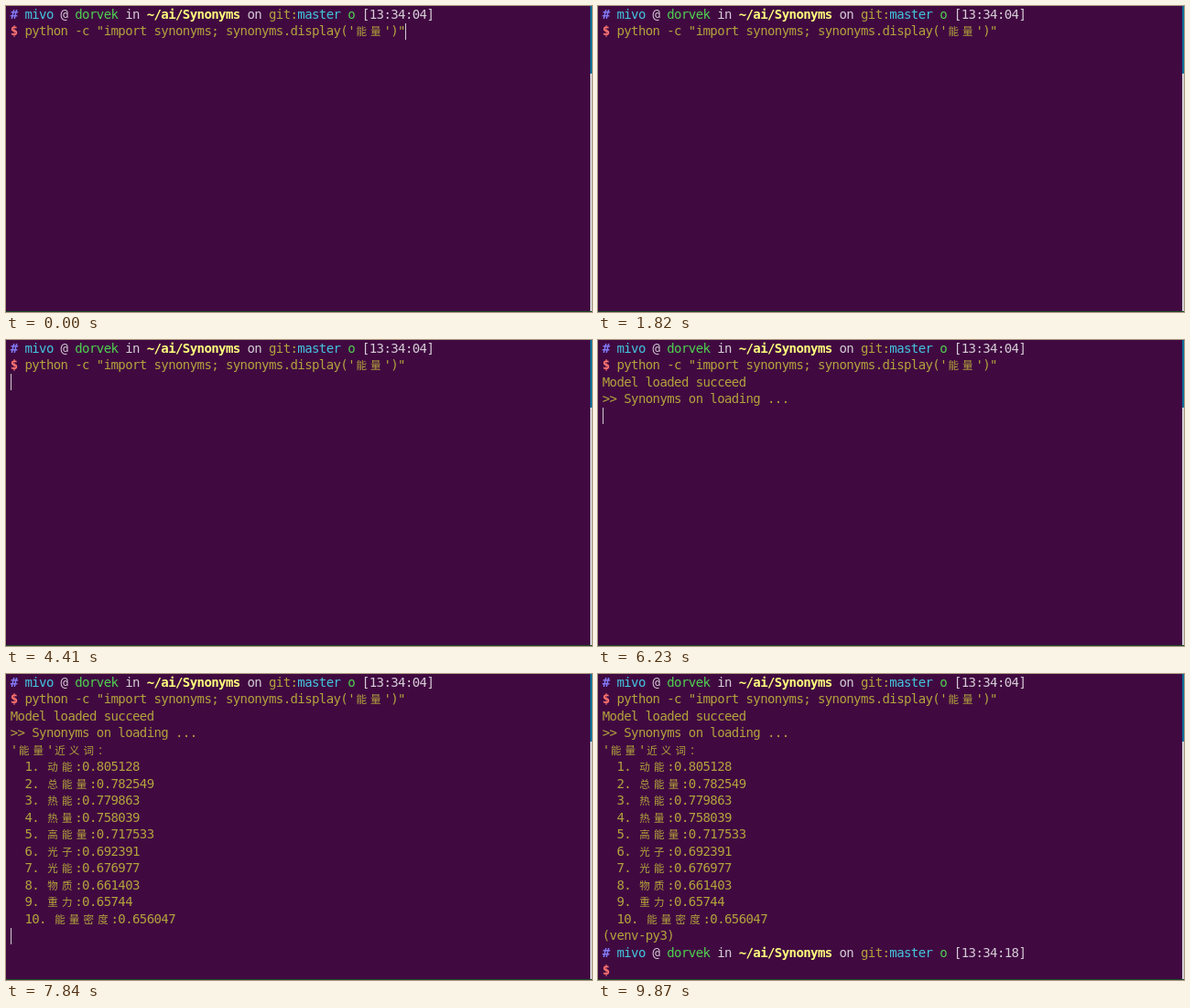
Write an HTML page with a canvas that moves like this. It is 640 by 335 pixels and loops after 9940 ms.

```html
<!DOCTYPE html>
<html lang="en">
<head>
<meta charset="utf-8">
<title>Terminal session</title>
<style>
  html, body { margin: 0; width: 640px; height: 335px; overflow: hidden; background: #400a41; }
  canvas { display: block; }
</style>
</head>
<body>
<canvas id="stage" width="640" height="335"></canvas>
<script>
const ctx = document.getElementById('stage').getContext('2d');
const LOOP = 9940, BLINK = 500;
const CELL = 7.84, ROW = 18.53, LEFT = 5;

const TEXT = '#b3a33c', WHITE = '#d6ccd6', CYAN = '#43c4df', GREEN = '#4fd150';
const BLUE = '#807af5', RED = '#ff7470', YELLOW = '#ffff7c';

const prompt = time => [
  ['#', BLUE, 'bold'], [' mivo', CYAN], [' @ ', WHITE], ['dorvek', GREEN], [' in ', WHITE],
  ['~/ai/Synonyms', YELLOW, 'bold'], [' on ', WHITE], ['git:', TEXT], ['master', CYAN],
  [' o', GREEN], [` [${time}]`, WHITE]
];
const dollar = ['$ ', RED, 'bold'];

const synonyms = [
  ['动能', 0.805128], ['总能量', 0.782549], ['热能', 0.779863], ['热量', 0.758039],
  ['高能量', 0.717533], ['光子', 0.692391], ['光能', 0.676977], ['物质', 0.661403],
  ['重力', 0.65744], ['能量密度', 0.656047]
];

const lines = [
  prompt('13:34:04'),
  [dollar, ['python -c "import synonyms; synonyms.display(\'能量\')"', TEXT]],
  [['Model loaded succeed', TEXT]],
  [['>> Synonyms on loading ...', TEXT]],
  [["'能量'近义词：", TEXT]],
  ...synonyms.map(([word, score], i) => [[`  ${i + 1}. ${word}:${score}`, TEXT]]),
  [['(venv-py3)', TEXT]],
  prompt('13:34:18'),
  [dollar]
];

// Each stage: start time, visible lines, cursor column and row
const stages = [
  { at: 0, count: 2, col: 55, row: 1 },
  { at: 3150, count: 2, col: 0, row: 2 },
  { at: 5180, count: 4, col: 0, row: 4 },
  { at: 7560, count: 15, col: 0, row: 15 },
  { at: 8260, count: 18, col: 2, row: 17 }
];

const isWide = ch => ch > '\u2e7f';

// Every glyph is centred in its cell; wide glyphs take two cells
function drawLine(runs, row) {
  const y = 13.5 + row * ROW;
  let col = 0;
  ctx.textAlign = 'center';
  for (const [text, color, weight = 'normal'] of runs) {
    ctx.fillStyle = color;
    for (const ch of text) {
      const span = isWide(ch) ? 2 : 1;
      ctx.font = span === 2
        ? '11.5px "Noto Sans CJK SC", "Noto Sans CJK", sans-serif'
        : `${weight} 14px "DejaVu Sans Mono", monospace`;
      ctx.fillText(ch, LEFT + (col + span / 2) * CELL - (span - 1), y);
      col += span;
    }
  }
}

function rect(color, x, y, w, h) {
  ctx.fillStyle = color;
  ctx.fillRect(x, y, w, h);
}

function draw() {
  const t = performance.now() % LOOP;
  const stage = stages.findLast(s => s.at <= t);

  rect('#400a41', 0, 0, 640, 335);
  lines.slice(0, stage.count).forEach(drawLine);

  if ((t - stage.at) % (2 * BLINK) < BLINK) {
    rect('#d2c8d2', Math.floor(LEFT + stage.col * CELL), Math.round(stage.row * ROW), 1, 18);
  }

  rect('#d5d0d6', 638, 0, 2, 334);
  rect('#0f6c98', 638, 0, 2, 74);
  rect('#1a4a28', 0, 334, 640, 1);
  requestAnimationFrame(draw);
}
draw();
</script>
</body>
</html>
```
